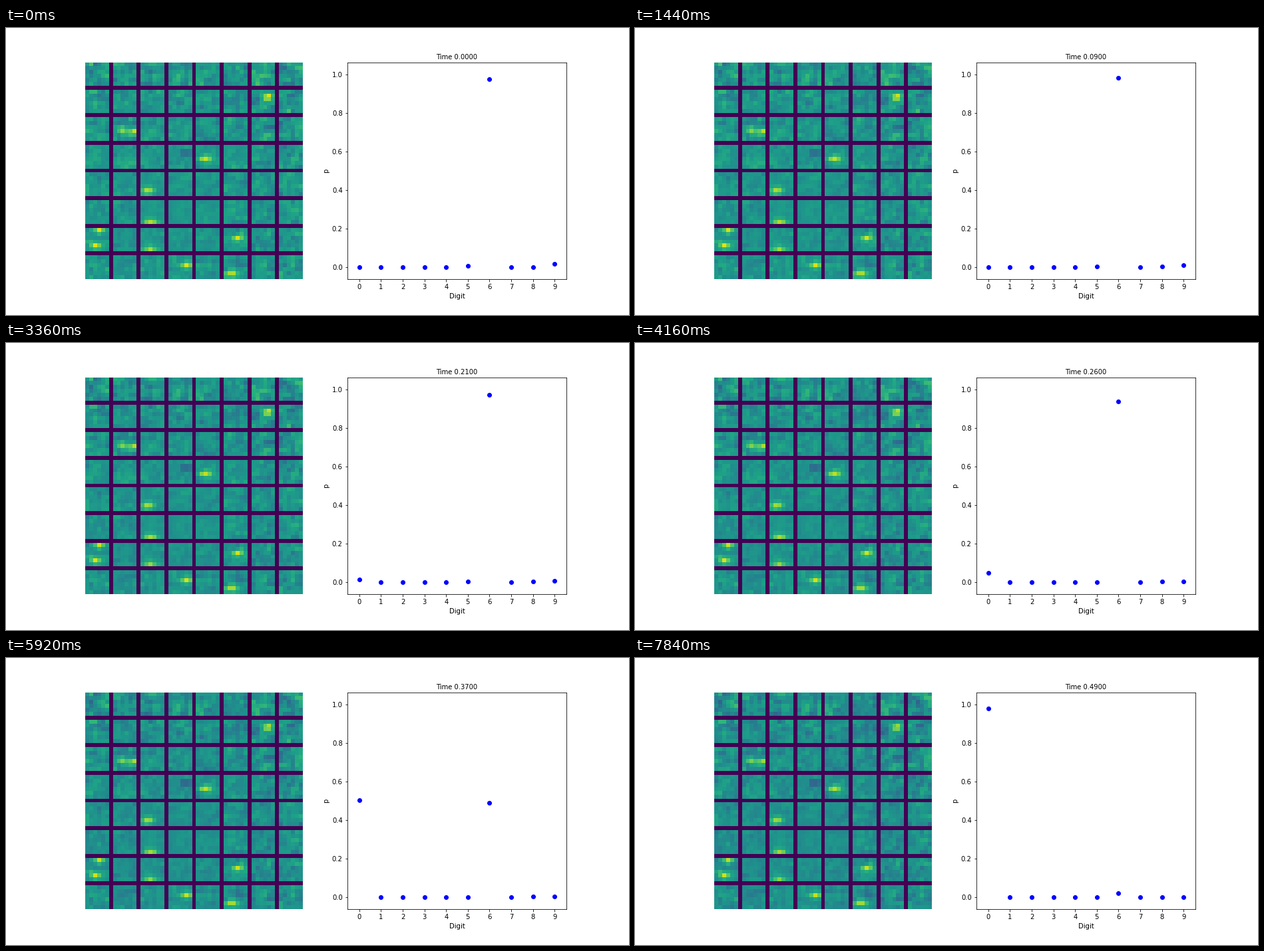
Write a matplotlib script that moves like this. It is 936 px wide and 432 px high and loops after 8000 ms.

```python
import numpy as np
import matplotlib.pyplot as plt
from matplotlib.animation import FuncAnimation

FRAMES = 50
TILE, TILES = 6, 8
PITCH = TILE + 1
SIZE = TILES * PITCH - 1

# Centres (row, column) of the strongest and weakest activations
HOT = [(42, 3), (46, 2), (40, 16), (47, 16), (17, 12), (17, 9), (8.5, 45.5),
       (24, 30), (32, 15.5), (44, 38), (53, 36.5), (1, 53.5), (51, 25)]
COLD = [(22.5, 24.5), (50.5, 38), (16, 46)]

rng = np.random.default_rng(6)
row, col = np.mgrid[:SIZE, :SIZE]
gaps = (row % PITCH == TILE) | (col % PITCH == TILE)


def soft_noise():
    n = rng.normal(size=(SIZE, SIZE))
    n += 0.45 * (np.roll(n, 1, 0) + np.roll(n, 1, 1))
    return np.clip(n / n.std(), -2.4, 2.4)


def blobs(centres):
    """Flat bumps, wider than high, one around each centre."""
    return sum(np.exp(-(row - r) ** 2 / 0.8 - (col - c) ** 2 / 2)
               for r, c in centres)


# Tiles are calm just below the middle and busier towards the edges
calm = np.hypot(row // PITCH - 5, col // PITCH - 2.8)
spread = 0.016 + 0.009 * calm
texture = spread * soft_noise() + 0.38 * blobs(HOT) - 0.2 * blobs(COLD)
drift = 0.5 * spread * soft_noise()


def activations(t):
    u = t / (FRAMES - 1)
    mean = 0.53 - 0.03 * u
    cells = np.clip(mean + texture + drift * (u - 0.5), 0, 1)
    cells[gaps] = 0
    return cells


def probabilities(t):
    p = np.full(10, 0.0016 * np.exp(-((t - 31) / 8) ** 2))
    p[5] = 0.007 * np.exp(-t / 14)
    p[8] = 0.0035 * max(0, np.sin(np.pi * t / 48))
    p[9] = 0.018 * np.exp(-t / 18)
    p[[0, 6]] = 0
    # The remaining mass passes from 6 to 0
    s = t - 37
    share = 1 / (1 + np.exp(-(0.03 + 0.295 * s + 0.002 * s * s)))
    rest = 1 - p.sum()
    p[0], p[6] = rest * share, rest * (1 - share)
    return p


plt.rcParams.update({"font.family": "DejaVu Sans", "font.size": 10})
fig, (left, right) = plt.subplots(1, 2, figsize=(13, 6), dpi=72)
fig.subplots_adjust(left=0.125, right=0.9, bottom=0.125, top=0.88, wspace=0.2)

image = left.imshow(activations(0), cmap="viridis", vmin=0, vmax=1,
                    interpolation="nearest")
left.axis("off")

digits = np.arange(10)
dots = right.scatter(digits, probabilities(0), c="b")
right.set(xlim=(-0.558, 9.558), ylim=(-0.0625, 1.0625),
          xticks=digits, xlabel="Digit", ylabel="p")
title = right.set_title("Time 0.0000", fontsize=10, pad=5)


def update(t):
    image.set_data(activations(t))
    dots.set_offsets(np.column_stack([digits, probabilities(t)]))
    title.set_text(f"Time {t / 100:.4f}")
    return image, dots, title


anim = FuncAnimation(fig, update, frames=FRAMES, interval=160,
                     repeat=True, repeat_delay=0)
plt.show()
```
